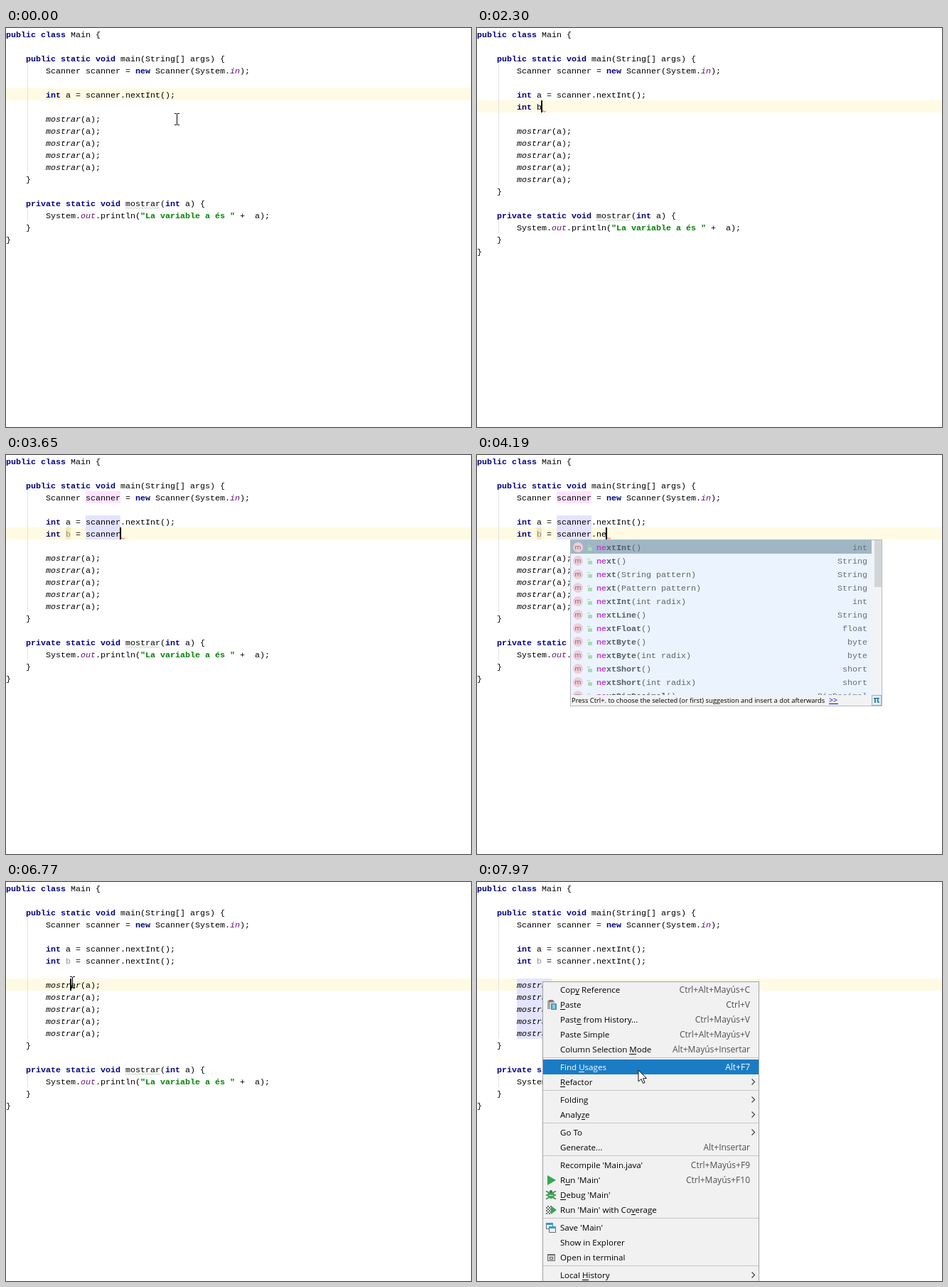
An HTML page with a canvas for the animation above (8000 ms loop, 654 by 562 pixels).

```html
<!DOCTYPE html>
<html lang="ca">
<head>
<meta charset="utf-8">
<title>Code editor</title>
<style>
html, body { margin: 0; width: 654px; height: 562px; overflow: hidden; background: #fff; }
canvas { display: block; }
</style>
</head>
<body>
<canvas id="stage" width="654" height="562"></canvas>
<script>
const ctx = document.getElementById('stage').getContext('2d');
const LOOP = 8000, CH = 7, LH = 17;
const MONO = '11.667px "Liberation Mono", monospace';
const UI = '"Open Sans", "Noto Sans", sans-serif';
const READ = '#e4e4ff', WRITE = '#ffe4ff';

const HEAD = [
  'public class Main {',
  '',
  '    public static void main(String[] args) {',
  '        Scanner scanner = new Scanner(System.in);',
  '',
  '        int a = scanner.nextInt();'
];
const TAIL = [
  '',
  ...Array(5).fill('        mostrar(a);'),
  '    }',
  '',
  '    private static void mostrar(int a) {',
  '        System.out.println("La variable a és " +  a);',
  '    }',
  '}'
];

// [time, text of the new line]
const TYPED = [
  [1090, ''], [1860, 'i'], [1930, 'in'], [2000, 'int'], [2140, 'int '],
  [2220, 'int b'], [2530, 'int b '], [2750, 'int b ='], [2820, 'int b = '],
  [3050, 'int b = s'], [3340, 'int b = sc'], [3570, 'int b = scanner'],
  [3880, 'int b = scanner.'], [4110, 'int b = scanner.n'],
  [4190, 'int b = scanner.ne'], [4650, 'int b = scanner.nextInt()'],
  [5190, 'int b = scanner.nextInt();']
];

// [icon, bold part, plain part, right text]
const LIST_IN = [
  ['', 'int', '', ''], ['', 'interface', '', ''],
  ['', '', 'inn', "Inserts 'if not null' statement"],
  ['', '', 'inst', 'Checks object type with instanceof and down-casts it']
];
const LIST_S = [
  ['v', '', 'scanner', 'Scanner'], ['', 'short', '', ''], ['', 'super', '', ''],
  ['p', '', 'args', 'String[]'], ['s', 'mostrar', '(int a)', 'void'],
  ['', '', 'scn', ''], ['', '', 'stopship', 'adds // STOPSHIP']
];
const LIST_NEXT = [
  ['Int', '', 'int'], ['', '', 'String'], ['', 'String pattern', 'String'],
  ['', 'Pattern pattern', 'String'], ['Int', 'int radix', 'int'],
  ['Line', '', 'String'], ['Float', '', 'float'], ['Byte', '', 'byte'],
  ['Byte', 'int radix', 'byte'], ['Short', '', 'short'],
  ['Short', 'int radix', 'short'], ['BigDecimal', '', 'BigDecimal']
].map(([kind, args, type]) => ['m', 'next' + kind, `(${args})`, type]);

const TIP = 'Press Ctrl+Espacio to see non-imported classes';
const TIP_DOT = 'Press Ctrl+. to choose the selected (or first) suggestion and insert a dot afterwards';

// label (& marks the mnemonic), shortcut or '>', icon; null is a separator
const MENU = [
  ['Cop&y Reference', 'Ctrl+Alt+Mayús+C'], ['&Paste', 'Ctrl+V', 'paste'],
  ['Past&e from History...', 'Ctrl+Mayús+V'], ['Paste Simple', 'Ctrl+Alt+Mayús+V'],
  ['Column Selection &Mode', 'Alt+Mayús+Insertar'], null,
  ['Find &Usages', 'Alt+F7'], ['&Refactor', '>'], null,
  ['Folding', '>'], ['Analy&ze', '>'], null,
  ['Go To', '>'], ['Generate...', 'Alt+Insertar'], null,
  ["Recompile 'Main.java'", 'Ctrl+Mayús+F9'], ["R&un 'Main'", 'Ctrl+Mayús+F10', 'run'],
  ["&Debug 'Main'", '', 'bug'], ["Run 'Main' with Co&verage", '', 'cover'], null,
  ["Save 'Main'", '', 'save'], ['Show in Explorer', ''], ['Open in terminal', '', 'term'], null,
  ['Local &History', '>']
];

const MOVE_UP = [[205, 70], [171, 36], [190, 56], [215, 78], [233, 89]];
const SETTLE = [[229, 88], [236, 84], [244, 86], [248, 90], [247, 91]];
const TO_CALL = [[236, 84], [220, 75], [196, 73], [170, 82], [144, 98], [120, 116], [104, 131], [95, 140], [93, 141]];
const DOWN_MENU = [[110, 152], [140, 172], [174, 206], [206, 241], [227, 265]];

const within = (t, a, b) => t >= a && t < b;
const stepOf = (pts, t, start, end) => {
  const i = Math.floor((t - start) / (end - start) * (pts.length - 1) + 1e-6);
  return pts[Math.max(0, Math.min(pts.length - 1, i))];
};

function box(x, y, w, h, color) {
  ctx.fillStyle = color;
  ctx.fillRect(x, y, w, h);
}

function text(s, x, y, color, font, align = 'left') {
  ctx.font = font;
  ctx.textAlign = align;
  ctx.fillStyle = color;
  ctx.fillText(s, x, y);
}

function disc(x, y, r, color) {
  ctx.fillStyle = color;
  ctx.beginPath();
  ctx.arc(x, y, r, 0, 7);
  ctx.fill();
}

function shape(pts, fill, stroke, close = true, width = 1) {
  ctx.beginPath();
  pts.forEach(([x, y]) => ctx.lineTo(x, y));
  if (close) ctx.closePath();
  if (fill) { ctx.fillStyle = fill; ctx.fill(); }
  if (stroke) { ctx.strokeStyle = stroke; ctx.lineWidth = width; ctx.stroke(); }
}

function frame(x, y, w, h, color) {
  ctx.strokeStyle = color;
  ctx.lineWidth = 1;
  ctx.strokeRect(x + .5, y + .5, w - 1, h - 1);
}

function wave(x1, x2, row, color) {
  const y = row * LH + 15, pts = [];
  for (let x = x1, up = 0; x <= x2; x += 2, up = 1 - up) pts.push([x, y + 1.5 - up * 2]);
  shape(pts, null, color, false);
}

const TOKEN = /"[^"]*"|(?<=System\.)(?:in|out)|mostrar(?=\(a\))|\b(?:public|class|static|void|new|int|private)\b|\bb\b/g;

function codeLine(s, row, greyB) {
  const y = row * LH + 13;
  const put = (part, at, color, style = '') => text(part, at * CH, y, color, style + MONO);
  let last = 0;
  for (const m of s.matchAll(TOKEN)) {
    const w = m[0];
    put(s.slice(last, m.index), last, '#000');
    if (w[0] === '"') put(w, m.index, '#008000', 'bold ');
    else if (w === 'in' || w === 'out') put(w, m.index, '#660e7a', 'italic ');
    else if (w === 'mostrar') put(w, m.index, '#000', 'italic ');
    else if (w === 'b') put(w, m.index, greyB ? '#909090' : '#000');
    else put(w, m.index, '#000080', 'bold ');
    last = m.index + w.length;
  }
  put(s.slice(last), last, '#000');
}

function padlock(x, y, color, open) {
  box(x - 2, y - 1, 6, 5, color);
  ctx.strokeStyle = color;
  ctx.lineWidth = 1;
  ctx.beginPath();
  ctx.arc(x + (open ? -1 : 1), y - 2, 2, Math.PI, 0);
  ctx.stroke();
}

function listIcon(kind, x, y) {
  if (!kind) return;
  const method = kind === 'm' || kind === 's';
  disc(x, y, 7, method ? '#f0cdd7' : kind === 'v' ? '#d6c49c' : '#eadfb4');
  text(method ? 'm' : kind, x, y + 3, '#6b6268', `9.5px ${UI}`, 'center');
  if (kind === 'm') padlock(x + 16, y + 1, '#acd9b1', true);
  else if (kind === 's') {
    padlock(x + 15, y + 1, '#efa3a3', false);
    shape([[x - 5, y + 1], [x - 2, y + 4], [x - 5, y + 7], [x - 8, y + 4]], '#8497a5');
  } else {
    ctx.strokeStyle = '#adc0cc';
    ctx.lineWidth = 1.5;
    ctx.beginPath();
    ctx.arc(x + 16, y, 2, 0, 7);
    ctx.stroke();
  }
}

function popup(x, w, rows, prefix, tip, scroll) {
  const y = 119, listH = scroll ? 218 : rows.length * 19, foot = y + 1 + listH, h = listH + 17;
  const side = x + w - 15;
  box(x, y, w, h, '#ebf4fe');
  ctx.save();
  ctx.beginPath();
  ctx.rect(x, y + 1, w, listH);
  ctx.clip();
  box(x + 1, y + 1, w - 16, 19, '#9fb6c6');
  box(side, y + 1, 14, listH, '#f1f3f5');
  if (scroll) box(side + 4, y + 1, 10, 66, '#d2d5d8');
  rows.forEach(([icon, bold, plain, right], i) => {
    const top = y + 1 + i * 19, tx = x + 37, base = top + 14;
    listIcon(icon, x + 11, top + 10);
    text(bold, tx, base, '#555c62', 'bold ' + MONO);
    text(plain, tx + bold.length * CH, base, '#5c6267', MONO);
    text(right, x + w - 21, base, '#686e73', MONO, 'right');
    const at = (bold + plain).indexOf(prefix);
    if (prefix && at >= 0) {
      const px = tx + at * CH;
      box(px, top + 2, prefix.length * CH, 16, i ? '#ebf4fe' : '#9fb6c6');
      text(prefix, px, base, '#c43fd0', (bold ? 'bold ' : '') + MONO);
    }
  });
  ctx.restore();
  box(x + 1, foot, w - 2, 15, '#f2f2f2');
  text(tip, x + 2, foot + 11, '#000', `9.35px ${UI}`);
  const link = Math.round(x + 8 + ctx.measureText(tip).width);
  text('>>', link, foot + 11, '#00f', `10.5px ${UI}`);
  box(link, foot + 12, 13, 1, '#00f');
  box(side, foot, 14, 15, '#e2f0f8');
  frame(side, foot, 14, 15, '#9ab6c5');
  text('π', side + 7, foot + 11, '#2878a8', `bold 12px ${UI}`, 'center');
  frame(x, y, w, h, '#b5babd');
}

function menuIcon(kind, x, y) {
  const green = '#35a852', grey = '#6e6e6e';
  if (kind === 'paste') {
    box(x - 5, y - 6, 10, 12, '#a8a8a8');
    box(x - 3, y - 7, 6, 3, '#7a7a7a');
    box(x - 1, y - 3, 9, 10, '#f1f1f1');
    box(x, y - 2, 8, 9, '#3c9ac2');
    for (let i = 0; i < 3; i++) box(x + 2, y + i * 2, 4, 1, '#d8f0f8');
  } else if (kind === 'run') {
    shape([[x - 5, y - 7], [x + 7, y], [x - 5, y + 7]], green);
  } else if (kind === 'bug') {
    for (let d = -4; d <= 4; d += 4) shape([[x - 7, y + d * 1.4], [x, y + d / 2], [x + 7, y + d * 1.4]], null, '#44704d', false, 1.5);
    disc(x, y, 5, green);
    box(x - 3, y, 6, 1, '#e2f0e4');
    disc(x, y - 5, 2, '#44704d');
  } else if (kind === 'cover') {
    for (let i = 0; i < 4; i++)
      for (let j = 0; j < 6; j++)
        if ((i + j) % 2) box(x - 7 + i * 2, y - 6 + j * 2, 2, 2, grey);
    shape([[x, y - 6], [x + 8, y], [x, y + 6]], green);
  } else if (kind === 'save') {
    for (const [dx, dy] of [[-7, -7], [-3, -2]]) {
      box(x + dx, y + dy, 10, 9, '#e8f3f8');
      frame(x + dx, y + dy, 10, 9, grey);
      box(x + dx, y + dy, 10, 3, '#3c9ac2');
    }
  } else if (kind === 'term') {
    box(x - 5, y - 5, 11, 10, '#d5d5d5');
    frame(x - 5, y - 5, 11, 10, grey);
    box(x - 5, y - 5, 11, 2, grey);
    frame(x - 2, y - 1, 5, 4, grey);
  }
}

function menu(px, py, live) {
  const x = 92, w = 305;
  box(x, 140, w, 430, '#f1f1f1');
  let top = 141;
  for (const item of MENU) {
    if (!item) {
      box(x + 1, top + 1, w - 2, 1, '#c6c6c6');
      top += 4;
      continue;
    }
    const [label, key, icon] = item, hot = live && within(py, top, top + 21);
    if (hot) box(x + 1, top, w - 2, 21, '#1a7cc4');
    const ink = hot ? '#fff' : '#000', mark = label.indexOf('&'), base = top + 15;
    const name = label.replace('&', '');
    text(name, 117, base, ink, `11.6px ${UI}`);
    if (mark >= 0) {
      const from = ctx.measureText(name.slice(0, mark)).width;
      box(Math.round(117 + from), base + 2, Math.round(ctx.measureText(name[mark]).width), 1, ink);
    }
    if (key === '>') shape([[386.5, top + 6.5], [390.5, top + 10.5], [386.5, top + 14.5]], null, '#444', false, 1.2);
    else text(key, 384, base, hot ? '#fff' : '#505050', `12px ${UI}`, 'right');
    menuIcon(icon, 104, top + 11);
    top += 21;
  }
  frame(x, 140, w, 430, '#a2a2a2');
  shape([[0, 0], [0, 16], [4, 12.5], [6.5, 18.5], [9, 17.5], [6.5, 11.8], [11.5, 11.5]]
    .map(([a, b]) => [px + a, py + b]), '#fff', '#111');
}

function beam([x, y]) {
  box(x - 3, y - 8, 3, 1, '#000');
  box(x + 1, y - 8, 3, 1, '#000');
  box(x, y - 7, 1, 15, '#000');
  box(x - 3, y + 8, 3, 1, '#000');
  box(x + 1, y + 8, 3, 1, '#000');
}

function draw(t) {
  const typed = TYPED.filter(s => s[0] <= t).pop();
  const line = typed ? typed[1] : '', end = 56 + line.length * CH;
  const lines = typed ? [...HEAD, '        ' + line, ...TAIL] : [...HEAD, ...TAIL];
  const shift = typed ? 1 : 0, clicked = t >= 6770;
  const caretRow = clicked ? 8 : typed ? 6 : 5;

  box(0, 0, 654, 562, '#fff');
  box(0, caretRow * LH, 654, LH, '#fffae3');

  const mark = (x, row, w, color) => box(x, row * LH, w, LH, color);
  if (within(t, 3650, 4960)) {
    mark(112, 3, 49, WRITE);
    mark(112, 5, 49, READ);
    mark(112, 6, 49, READ);
    mark(84, 6, 7, '#f5e9bd');
  }
  if (within(t, 4650, 6770)) mark(217, 6, 14, '#99ccff');
  if (t >= 7080) {
    for (let r = 8; r < 13; r++) mark(56, r, 49, READ);
    mark(168, 15, 49, WRITE);
  }

  box(30, 3 * LH, 1, (9 + shift) * LH, '#e2e2e2');
  box(30, (15 + shift) * LH, 1, LH, '#e2e2e2');
  lines.forEach((s, row) => codeLine(s, row, t >= 2590));

  wave(168, 217, 14 + shift, '#b3d2b0');
  if (within(t, 2300, 2890) || within(t, 3650, 5500)) wave(end, end + 6, 6, '#f33');
  if (within(t, 2890, 3650)) {
    wave(56, end, 6, '#f33');
    wave(0, 133, 8, '#f33');
  }

  if (within(t, 640, 7220)) {
    const cx = clicked ? 91 : typed ? end : 238;
    box(cx - 1, caretRow * LH, 2, LH, '#000');
  }

  if (within(t, 1930, 2000)) popup(19, 460, LIST_IN, 'in', TIP);
  if (within(t, 3110, 3340)) popup(75, 393, LIST_S, 's', TIP);
  if (within(t, 3340, 3570)) popup(75, 393, [LIST_S[0], LIST_S[5]], 'sc', TIP);
  if (within(t, 3880, 4650)) popup(131, 439, LIST_NEXT, line.split('.')[1], TIP_DOT, true);

  if (t < 60) beam([240, 128]);
  else if (t < 570) beam(stepOf(MOVE_UP, t, 60, 410));
  else if (t < 1090) beam(stepOf(SETTLE, t, 570, 850));
  else if (within(t, 6190, 7220)) beam(stepOf(TO_CALL, t, 6190, 6770));
  else if (t >= 7220) {
    const live = t >= 7690;
    const [px, py] = live ? stepOf(DOWN_MENU, t, 7690, 7970) : [93, 141];
    menu(px, py, live);
  }
}

const began = performance.now();
function tick() {
  draw((performance.now() - began) % LOOP);
  requestAnimationFrame(tick);
}
tick();
</script>
</body>
</html>
```
